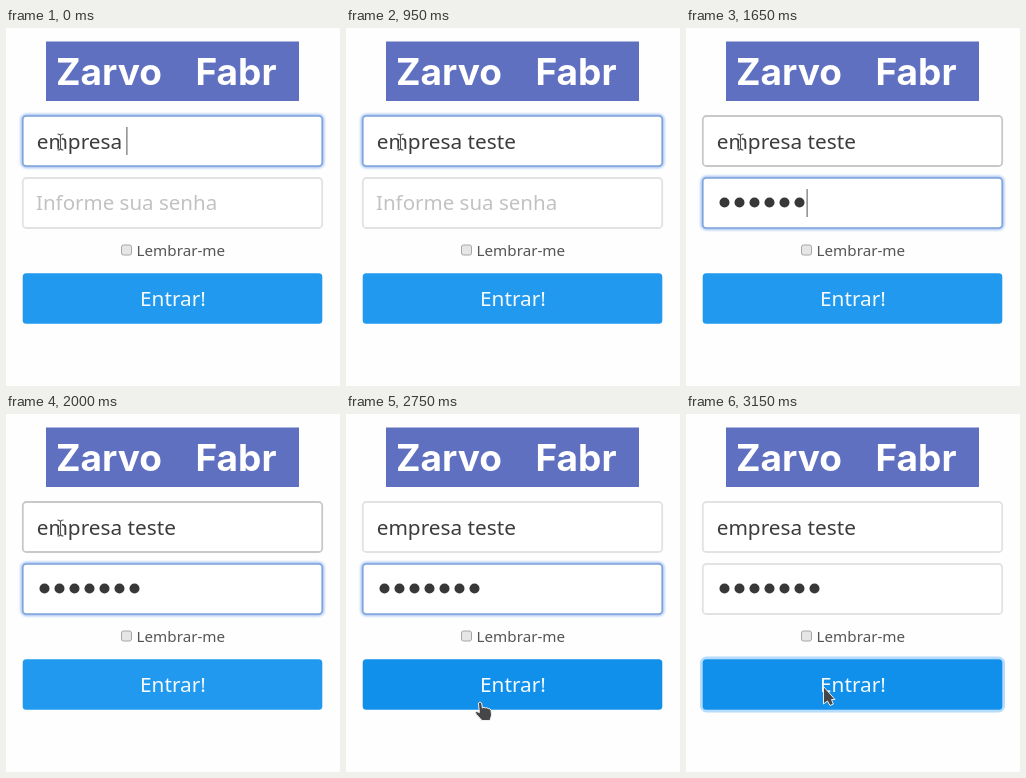
Animation, 334 px wide and 358 px high, one loop 3250 ms. Source, as an HTML page:

```html
<!DOCTYPE html>
<html lang="pt">
<meta charset="utf-8">
<style>
  html, body { margin: 0; width: 100%; height: 100%; overflow: hidden; background: #fefefe; }
  svg { display: block; }
  text { font: 20.8px "Noto Sans", sans-serif; fill: #3c3c3c; white-space: pre; }
  .box { fill: #fff; stroke: #e2e2e2; stroke-width: 1.8; }
  .glow { fill: none; stroke: #a9c6f3; stroke-width: 4.5; filter: blur(.9px); }
  .edge { fill: #fff; stroke: #7da3da; stroke-width: 1.6; }
  .logo { font: 700 37px Inter, sans-serif; fill: #fff; text-anchor: middle; }
  .pointer { fill: #464649; stroke: #f0f0f0; stroke-width: 1; stroke-linejoin: round; }
</style>
<svg width="334" height="358" viewBox="0 0 334 358">
  <defs>
    <rect id="field" x="16.8" y="88" width="299.4" height="50" rx="3.5"/>
  </defs>
  <rect x="40" y="13.5" width="253" height="59.5" fill="#6070c0"/>
  <text class="logo" x="103" y="57">Zarvo</text>
  <text class="logo" x="230" y="57">Fabr</text>

  <use id="userBox" href="#field" class="box"/>
  <g id="userFocus"><use href="#field" class="glow"/><use href="#field" class="edge"/></g>
  <text id="user" x="30.7" y="121"></text>

  <g transform="translate(0 62)">
    <use href="#field" class="box"/>
    <g id="passFocus"><use href="#field" class="glow"/><use href="#field" class="edge"/></g>
  </g>
  <text id="hint" x="30" y="182" style="fill:#c2c2c2;font-size:20.5px">Informe sua senha</text>
  <g id="dots" fill="#383838"></g>
  <rect id="caret" width="1" height="28" fill="#555"/>

  <rect x="115.5" y="217" width="10" height="10" rx="2" fill="#e6e6e6" stroke="#a6a6a6"/>
  <text x="130.6" y="228" style="fill:#555;font-size:15.2px">Lembrar-me</text>

  <rect id="ring" x="15.5" y="244" width="302" height="53" rx="5" fill="none" stroke="#b5dcfa" stroke-width="3"/>
  <rect id="button" x="16.7" y="245.3" width="299.6" height="50.4" rx="3.5"/>
  <text x="167" y="278" text-anchor="middle" style="fill:#f4faff">Entrar!</text>

  <g id="mouse">
    <g id="beam" fill="none">
      <path id="bar" d="M-3-8Q0-8 0-6Q0-8 3-8M0-6V6M-3 8Q0 8 0 6Q0 8 3 8"/>
      <use href="#bar" stroke="#fff" stroke-width="2.6"/>
      <use href="#bar" stroke="#555" stroke-width="1.1"/>
    </g>
    <path id="arrow" class="pointer" d="M0 0V17.5L4 14.5 6.5 19 9.8 17.6 8 13H11.5Z"/>
    <path id="hand" class="pointer" d="M-1.6 1Q0-1 1.6 1L2.4 6Q4 4.6 5.4 6Q7 5 8.2 6.6Q10.4 6 11 8.4L11.6 13 10 18.5H2L-3.6 12.5Q-5.4 10-3.4 9.4L-.6 10.6Z"/>
  </g>
</svg>
<script>
  const LOOP = 3250, STEP = 50, BLINK = 250;
  const userKeys = [100, 250, 350, 500, 650];
  const passKeys = [1400, 1450, 1500, 1500, 1600, 1650, 1750];
  const events = [0, ...userKeys, 1150, ...passKeys];
  // time, x, y of the pointer
  const path = [
    [0, 54.5, 114], [2200, 54.5, 114], [2300, 30, 190], [2400, -8.5, 331], [2450, -20, 338],
    [2550, 14, 326], [2650, 96, 306], [2750, 134, 288], [2800, 136, 277], [2850, 137.5, 272.5], [LOOP, 137.5, 272.5]
  ];

  const $ = id => document.getElementById(id);
  const clamp = v => Math.max(0, Math.min(1, v));
  const fade = (id, v) => $(id).setAttribute("opacity", clamp(v));
  const count = (keys, t) => keys.filter(k => k <= t).length;

  $("dots").innerHTML = passKeys.map((_, i) => `<circle cx="${38.5 + 15 * i}" cy="174.5" r="5"/>`).join("");

  function pointerAt(t) {
    const i = path.findIndex(p => p[0] > t);
    const [t0, x0, y0] = path[i - 1], [t1, x1, y1] = path[i];
    const k = (t - t0) / (t1 - t0);
    return [x0 + (x1 - x0) * k, y0 + (y1 - y0) * k];
  }

  function draw(t) {
    const onPass = t >= 1150;
    const typed = count(passKeys, t);
    $("user").textContent = "empresa " + "teste".slice(0, count(userKeys, t));
    fade("hint", typed ? 0 : 1);
    [...$("dots").children].forEach((dot, i) => dot.setAttribute("opacity", i < typed ? 1 : 0));

    const shift = (t - 1100) / 100, click = (t - 2750) / 100;
    fade("userFocus", 1 - shift);
    fade("passFocus", Math.min(shift, 1 - click));
    fade("ring", click);

    const idle = t - events.filter(e => e <= t).pop();
    fade("caret", t < 2750 && Math.floor(idle / BLINK) % 2 === 0 ? 1 : 0);
    $("caret").setAttribute("x", onPass ? 30.6 + 15 * typed : 29.5 + $("user").getComputedTextLength());
    $("caret").setAttribute("y", onPass ? 161 : 99);

    const [x, y] = pointerAt(t);
    const inside = (top, bottom) => x > 17 && x < 316 && y > top && y < bottom;
    const onUser = inside(88, 138), onButton = inside(245, 296);
    const shape = onUser || inside(150, 200) ? "beam" : onButton && t < 2850 ? "hand" : "arrow";
    for (const id of ["beam", "arrow", "hand"]) fade(id, id === shape ? 1 : 0);
    $("mouse").setAttribute("transform", `translate(${x} ${y})`);
    $("userBox").style.stroke = onUser ? "#c8c8c8" : "#e2e2e2";
    $("button").setAttribute("fill", onButton ? "#1090ea" : "#2199ee");
  }

  function tick(now) {
    draw(Math.floor(now % LOOP / STEP) * STEP);
    requestAnimationFrame(tick);
  }
  draw(0);
  requestAnimationFrame(tick);
</script>
</html>
```
